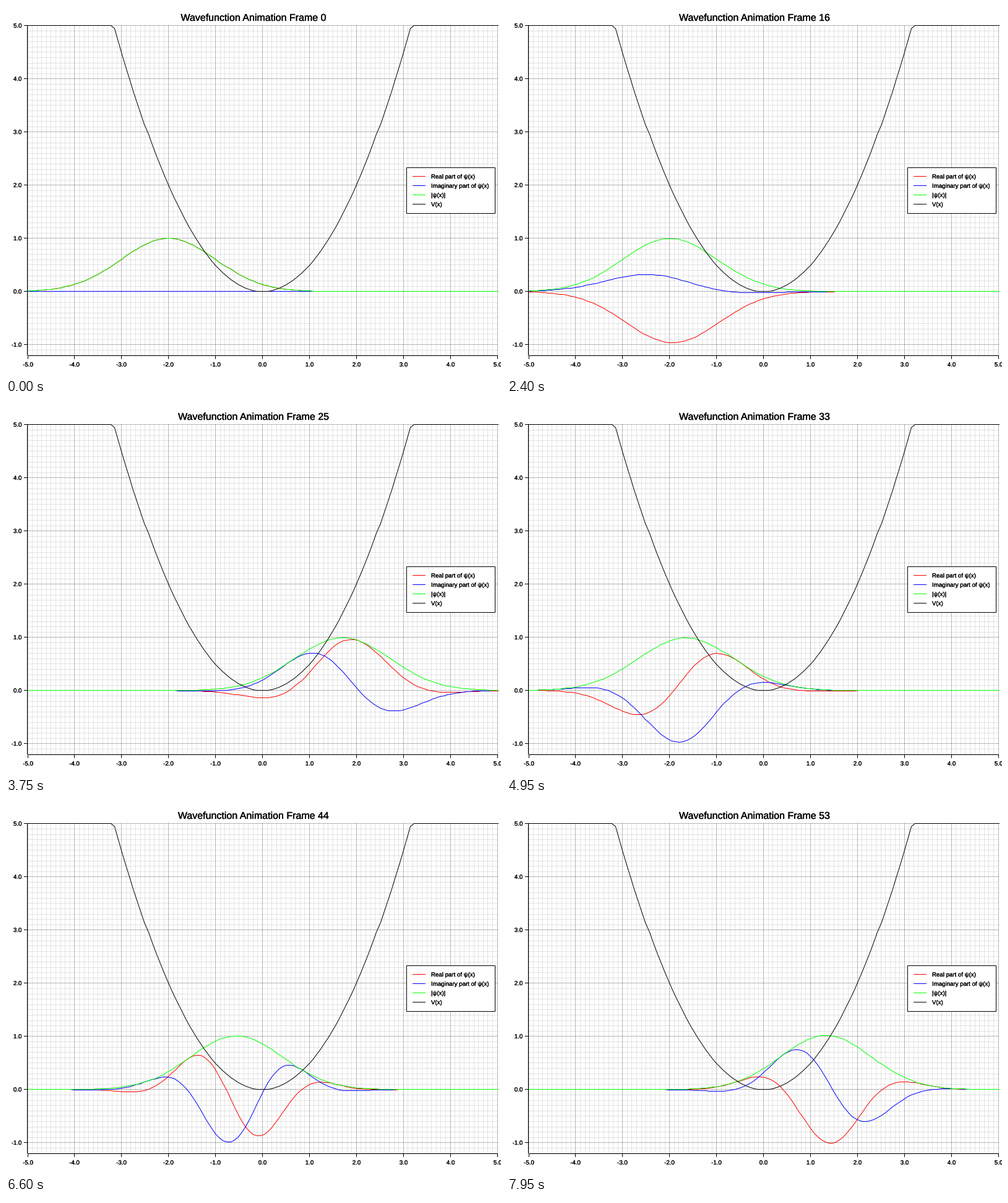
These frames come from a looping animation (800x600 px, 8000 ms). A matplotlib script:

```python
import numpy as np
import matplotlib.pyplot as plt
import matplotlib.patheffects as pe
from matplotlib.animation import FuncAnimation
from matplotlib.patches import Rectangle

WIDTH, HEIGHT, DPI = 800, 600, 100
LEFT, TOP, BOTTOM = 35, 31, 564
X_SCALE, Y_SCALE = 75.9, 533 / 6.2
PX = 72 / DPI
DT = 0.4
TICK_MS, TICKS_PER_STEP, TICKS = 50, 3, 160
RED, BLUE, GREEN, BLACK = "#ff0000", "#0000ff", "#00ff00", "#000000"

plt.rcParams["font.family"] = ["Liberation Sans", "DejaVu Sans"]
plt.rcParams["path.simplify"] = False
plt.rcParams["path.snap"] = False


def col(x):
    """Whole pixel column of x, kept inside the plot."""
    return np.clip(LEFT + np.floor(X_SCALE * (np.asarray(x) + 5) + 1e-3), LEFT, 795)


def row(y):
    """Whole pixel row of y, kept inside the plot."""
    return np.clip(BOTTOM - np.floor(Y_SCALE * (np.asarray(y) + 1.2) + 1e-3), TOP, BOTTOM)


# Wave packet in a harmonic well, on a finite-difference grid
x, step = np.linspace(-10, 10, 252, retstep=True)
potential = x**2 / 2
hop = np.full(x.size - 1, -0.5 / step**2)
hamiltonian = np.diag(potential + 1 / step**2) + np.diag(hop, 1) + np.diag(hop, -1)
energy, modes = np.linalg.eigh(hamiltonian)
weights = modes.T @ np.exp(-((x + 2) ** 2) / 2)
shown = np.abs(x) < 5.1


def wave(t):
    return (modes @ (weights * np.exp(-1j * energy * t)))[shown]


fig = plt.figure(figsize=(WIDTH / DPI, HEIGHT / DPI), dpi=DPI, facecolor="white")
ax = fig.add_axes([0, 0, 1, 1])
ax.set_xlim(0, WIDTH)
ax.set_ylim(HEIGHT, 0)
ax.axis("off")


def vlines(xs, y0, y1, alpha=1):
    ax.vlines(np.asarray(xs) + 0.5, y0, y1, lw=PX, color=BLACK, alpha=alpha, zorder=1)


def hlines(ys, x0, x1, alpha=1):
    ax.hlines(np.asarray(ys) + 0.5, x0, x1, lw=PX, color=BLACK, alpha=alpha, zorder=1)


def label(px, py, text, size=9.68, align="left", z=3, weight=0.25):
    return ax.text(px, py, text, fontsize=size * PX, ha=align, va="baseline", zorder=z,
                   path_effects=[pe.withStroke(linewidth=weight * PX, foreground=BLACK)])


def curve(color, z):
    return ax.plot([], [], color=color, lw=PX, zorder=z)[0]


# Grid, axes and tick labels
x_ticks, y_ticks = np.arange(-5, 6), np.arange(-1, 6)
for xs, ys, alpha in ((np.arange(-50, 51) / 10, np.arange(-12, 51) / 10, 0.1),
                      (x_ticks, y_ticks, 0.2)):
    vlines(col(xs), TOP, BOTTOM + 1, alpha)
    hlines(row(ys), LEFT, 795, alpha)

vlines([34], TOP, BOTTOM + 1)
hlines([565], LEFT, 795)
vlines(col(x_ticks), 566, 571)
hlines(row(y_ticks), 29, 34)
for v in x_ticks:
    label(col(v) + 0.5, 583, f"{v:.1f}", align="center")
for v in y_ticks:
    label(25.3, row(v) + 4, f"{v:.1f}", align="right")

title = label(400, 24, "", size=16, align="center", weight=0.35)

# Curves
real_line, imag_line, abs_line = curve(RED, 4), curve(BLUE, 5), curve(GREEN, 6)
columns = col(x[shown]) + 0.5
curve(BLACK, 7).set_data(columns, row(potential[shown]) + 0.5)

# Legend
ax.add_patch(Rectangle((647.5, 261.5), 143, 74, fc="white", ec=BLACK, lw=PX, zorder=8))
for i, (text, color) in enumerate((("Real part of ψ(x)", RED), ("Imaginary part of ψ(x)", BLUE),
                                   ("|ψ(x)|", GREEN), ("V(x)", BLACK))):
    y = 275 + 15 * i
    ax.plot([657, 678], [y + 0.5] * 2, color=color, lw=PX, zorder=9, solid_capstyle="butt")
    label(687, y + 4, text, z=9)


def update(tick):
    n = tick // TICKS_PER_STEP
    psi = wave(n * DT)
    for line, values in ((real_line, psi.real), (imag_line, psi.imag), (abs_line, np.abs(psi))):
        line.set_data(columns, row(values) + 0.5)
    title.set_text(f"Wavefunction Animation Frame {n}")
    return real_line, imag_line, abs_line, title


anim = FuncAnimation(fig, update, frames=TICKS, interval=TICK_MS, repeat=True, repeat_delay=0)
plt.show()
```
